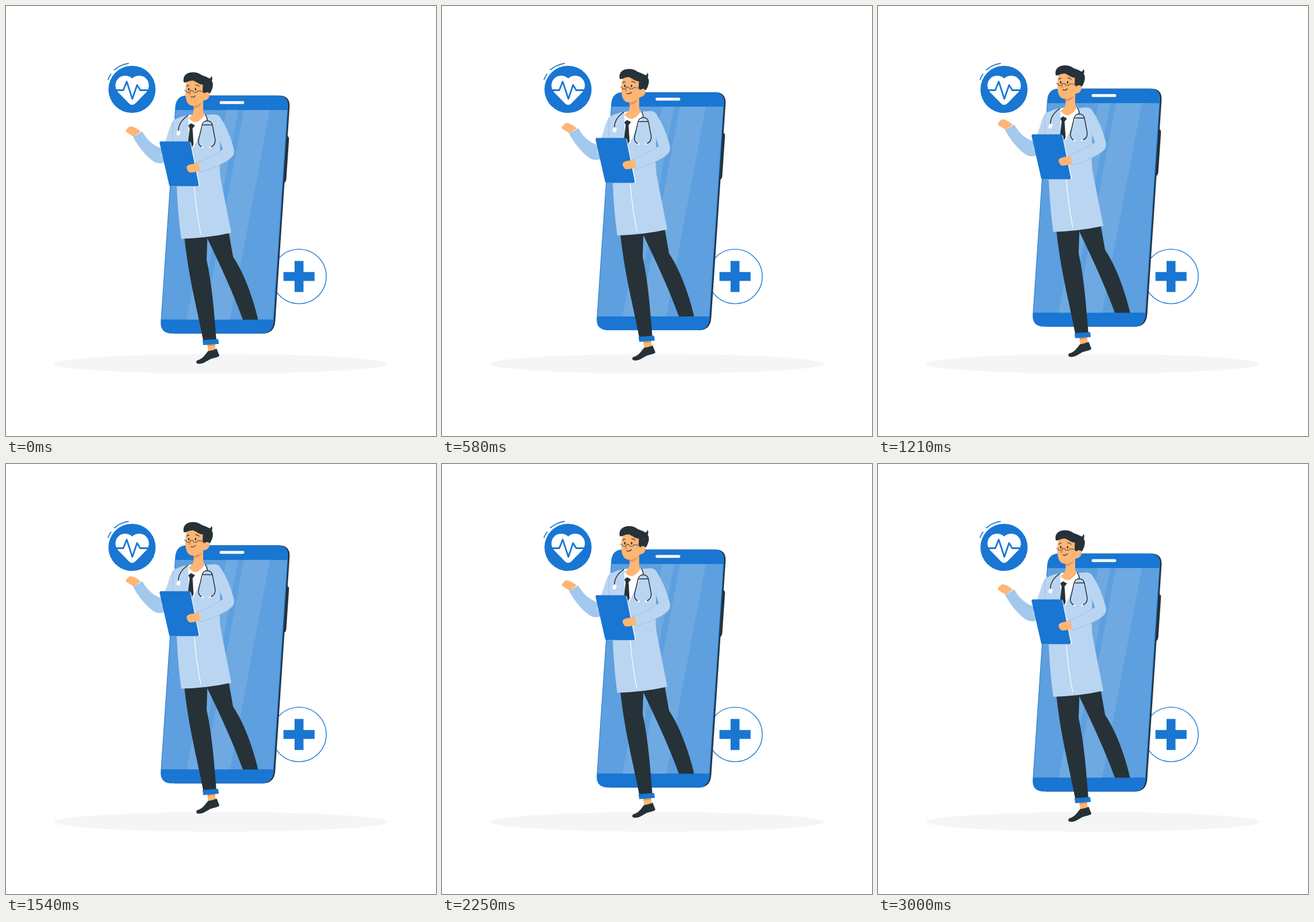
Write an HTML page that moves like this. It is 748x748 px and loops after 3.04 s.

```html
<!DOCTYPE html>
<html lang="en">
<head>
<meta charset="utf-8">
<title>Doctor stepping out of a phone</title>
<style>
  html, body { margin: 0; width: 100%; height: 100%; overflow: hidden; background: #fff; }
  svg { display: block; width: 100vw; height: 100vh; }
  .blue { fill: #1976d2; }
  .dark { fill: #263238; }
  .skin { fill: #ffb573; }
  .coat { fill: #bad5f1; }
  .sleeve { fill: #a3c8ed; }
  .white { fill: #fff; }
  .line { fill: none; stroke-linecap: round; stroke-linejoin: round; }
  .ink { stroke: #263238; }
  .edge { stroke: #1976d2; }
  .seam { stroke: #94bce6; stroke-width: .8; }
</style>
</head>
<body>
<svg viewBox="0 0 748 748">
  <defs>
    <clipPath id="screen"><path d="M295 181 H489.3 L464.7 546 H270.3 Z"/></clipPath>
  </defs>

  <ellipse cx="374" cy="622.5" rx="290" ry="17" fill="#f5f5f5"/>

  <g id="plus">
    <circle cx="509.7" cy="470.5" r="47.4" fill="#fff" class="edge" stroke-width="1.4"/>
    <path class="blue" d="M502 443.5h15.5v19.3h19.3v15.5h-19.3v19.2h-15.500v-19.200h-19.300v-15.500h19.300z"/>
  </g>

  <g id="badge">
    <circle class="blue" cx="219.200" cy="145" r="41"/>
    <path class="white" d="M219.500 126C214 120.500 204 119.500 197 124.500C189 131 188.500 142 194.500 149.500L214 169.500Q219.500 174.500 225 169.500L244.500 149.500C250.500 142 250 131 242 124.500C235 119.500 225 120.500 219.500 126Z"/>
    <path class="line edge" stroke-width="2.800" d="M190 146.500H204L210 131.500L219.800 161.500L228 137.500L233.500 146.500H250"/>
    <path class="line edge" stroke-width="1.700" d="M188.500 111Q199 102 213 99.800M177.500 128Q179.500 122.500 182.500 118.500"/>
  </g>

  <g id="float">
    <g id="phone">
      <path class="dark" d="M488.500 226.500Q492.500 227 492.300 232L487.500 302Q487 308 482 308Z"/>
      <path class="dark" d="M316 156H474.500Q494.500 156 493.300 176L468.300 549Q466.500 570 446.500 570H292Z"/>
      <path class="blue" d="M314.500 156H472Q492.200 156 490.900 176L465.800 549Q464 570 444 570H289Q267.800 570 269.200 549L294.300 177Q295.700 156 314.500 156Z"/>
      <rect class="white" x="371.500" y="165.600" width="43" height="5" rx="2.500"/>
      <g clip-path="url(#screen)">
        <path fill="#5e9fdf" d="M260 181H500V546H260Z"/>
        <path fill="#6ea9e2" d="M383 181H404L335 546H314ZM414 181H459L390 546H345Z"/>
      </g>
    </g>

    <g id="legs">
      <path class="dark" d="M349 402L387.500 394L395 436.500C413 463 429 505 438.500 546H412C393 494 372 450 349 402Z"/>
      <path class="skin" d="M350 588L363.500 587L365 600L352 603Z"/>
      <path fill="#e8945b" d="M350.300 589.500L364 588.500L364.200 590.500L351 592.500Z"/>
      <path class="dark" d="M310 400L350.500 398L349 442C359 487 362 535 366 582H343C332 525 317 470 310 400Z"/>
      <path class="blue" d="M341.800 581.500L369 579.500L370.300 588L343.200 590.300Z"/>
      <path class="dark" d="M351.500 600.500Q358 600 366.500 596.500L371.200 608.500C369 612 361 612 354.500 615C347 619.500 341 624 333 622.300C330.500 621.500 330.500 617.500 333 616.500C342 614.500 346 607 351.500 600.500Z"/>
    </g>

    <g id="far-arm">
      <path class="skin" d="M234.500 218.500L226 212.500Q219 208.500 214.500 210L209 215.500Q207.500 218 210 220L222 227.500Z"/>
      <path class="sleeve" d="M221 228L237 218.500Q249 240 268 247L290 262L276 272Q266 276.500 256 270C242 260 229 243 221 228Z"/>
      <path class="coat" d="M294 195C285 205 283 220 277.500 234L268 262L296 260Z"/>
    </g>

    <g id="torso">
      <path class="coat" d="M316 190Q297 194 292 200Q289.500 204 290 214L297 314Q299 362 304.800 405.200Q350 404 392 394.800Q381 340 372.800 297L371.500 276Q386 270 393 263Q399 257 395.500 246Q388 217 372.500 193.500Q370 189 362 188.600L346 190Z"/>
      <path fill="#5e9fdf" d="M372 234L377 249.500L372.500 253.500Z"/>
      <path class="line seam" d="M291 201Q289.500 212 290.500 234M372.500 235V253M372 275V290"/>
      <path class="white" d="M317 190L346 188L349 196L326 247L318 232Z"/>
      <path class="line" stroke="#fff" stroke-width="1.200" d="M327.500 313Q331 360 339 397.500"/>
      <path class="skin" d="M325 168L343 162V181Q343 187 345.500 189.500Q340 199 331 202.500Q322 201.500 317.500 194.500Q327 190 326.500 180Z"/>
      <path fill="#e8945b" d="M326 174Q334 174 341 168Q337 178 326.500 178Z"/>
      <path class="dark" d="M317.200 208L321.800 204.200L328.800 208L324.500 213.200L326.300 241L321.500 249L317 235L319.500 213Z"/>
    </g>

    <g id="stethoscope">
      <path class="line ink" stroke-width="1.500" d="M316.500 190.500C307 197 300 206 300 217M346.500 189.500Q350 193 350.200 199.500M341.500 246Q333 242 335 233L341 208Q343 200 350.200 200Q357.500 200 359.200 208L363.800 232Q365 242 356 245.500M341.500 207H359"/>
      <ellipse class="white" cx="300.200" cy="221.300" rx="3.300" ry="4.400" transform="rotate(18 300.200 221.300)"/>
      <circle class="white" cx="342" cy="246" r="1.800"/>
      <circle class="white" cx="355" cy="246" r="1.800"/>
    </g>

    <g id="clipboard">
      <path class="white" d="M272 236H318Q321 236 321.800 238.500L336.800 311Q337 314 334 314H288Z"/>
      <path class="blue" d="M269.500 235.600H317.500Q320 235.600 320.600 238L335.300 311Q335.600 313.800 333 313.800H287Q284.300 313.800 283.700 311.300L267.200 238.500Q267 235.600 269.500 235.600Z"/>
    </g>

    <g id="near-arm">
      <path class="coat" d="M332 272.500Q357 263 377.500 249.500L394 243Q399 256 392 263C381 274 357 284 337.500 289Z"/>
      <path class="line seam" d="M332 272.500Q357 263 377.500 249.500M337.500 289Q354 285 371.500 277"/>
      <path class="skin" d="M335 272.500L325 275Q317 275.500 314.300 279.500Q313.500 282 316 286.500Q318 290.500 323 290L337.800 287.300Z"/>
    </g>

    <g id="head">
      <path class="skin" d="M314 132C311.500 143 311 158 314.500 166C317 173 324 175.500 332 172.500C338 170 343 166 346 163L352 140L340 126Z"/>
      <path class="dark" d="M309.300 133C307.500 126 310 119 318 116.500C326 114 335 116 340.500 120.500Q348 123 354.500 126.500Q357 125 357.500 121.800Q359.800 126 358 130.500C361.500 135 360 144 355 152L346.500 155L342 149L342.500 137C336 137 331 132 326 130C319 129 314 134 309.300 133Z"/>
      <path class="skin" d="M343 154Q347 149 352 150.500Q355.500 152.500 353.500 158Q350.500 164.500 344 164.500Z"/>
      <path class="line ink" stroke-width="1.200" d="M314.500 140Q316 137.700 318.500 138M330 137.500Q333.500 137 336 140M321.500 158.200Q326 160 329.500 156.300"/>
      <path fill="#ed893e" d="M320.500 148.500L317.500 153.500Q319 155.500 321.500 154.500Z"/>
      <ellipse class="dark" cx="318" cy="145" rx="1.300" ry="2.200"/>
      <ellipse class="dark" cx="329.800" cy="145" rx="1.300" ry="2.200"/>
      <path class="line" stroke="#56616a" stroke-width="1.200" d="M310.500 146.500L313 147.500Q314 151 317.500 150.500Q320.500 150 321 147L325 147.500Q326 150.800 330 150.500Q333.500 150 334 147.500L343 149"/>
    </g>
  </g>
</svg>
<script>
  const LOOP = 3040, PERIOD = 3000, RISE = 15, FPS = 24, LEAD = 20;
  const floating = document.getElementById('float');

  // Steady rise and fall, stepped at the frame rate.
  function lift(ms) {
    const step = Math.floor((ms + 5) * FPS / 1000);
    const phase = ((step * 1000 / FPS + LEAD) % PERIOD) / PERIOD;
    return RISE * (1 - Math.abs(1 - 2 * phase));
  }

  function draw(now) {
    floating.setAttribute('transform', `translate(0 ${-lift(now % LOOP).toFixed(3)})`);
    requestAnimationFrame(draw);
  }
  draw(performance.now());
</script>
</body>
</html>
```
